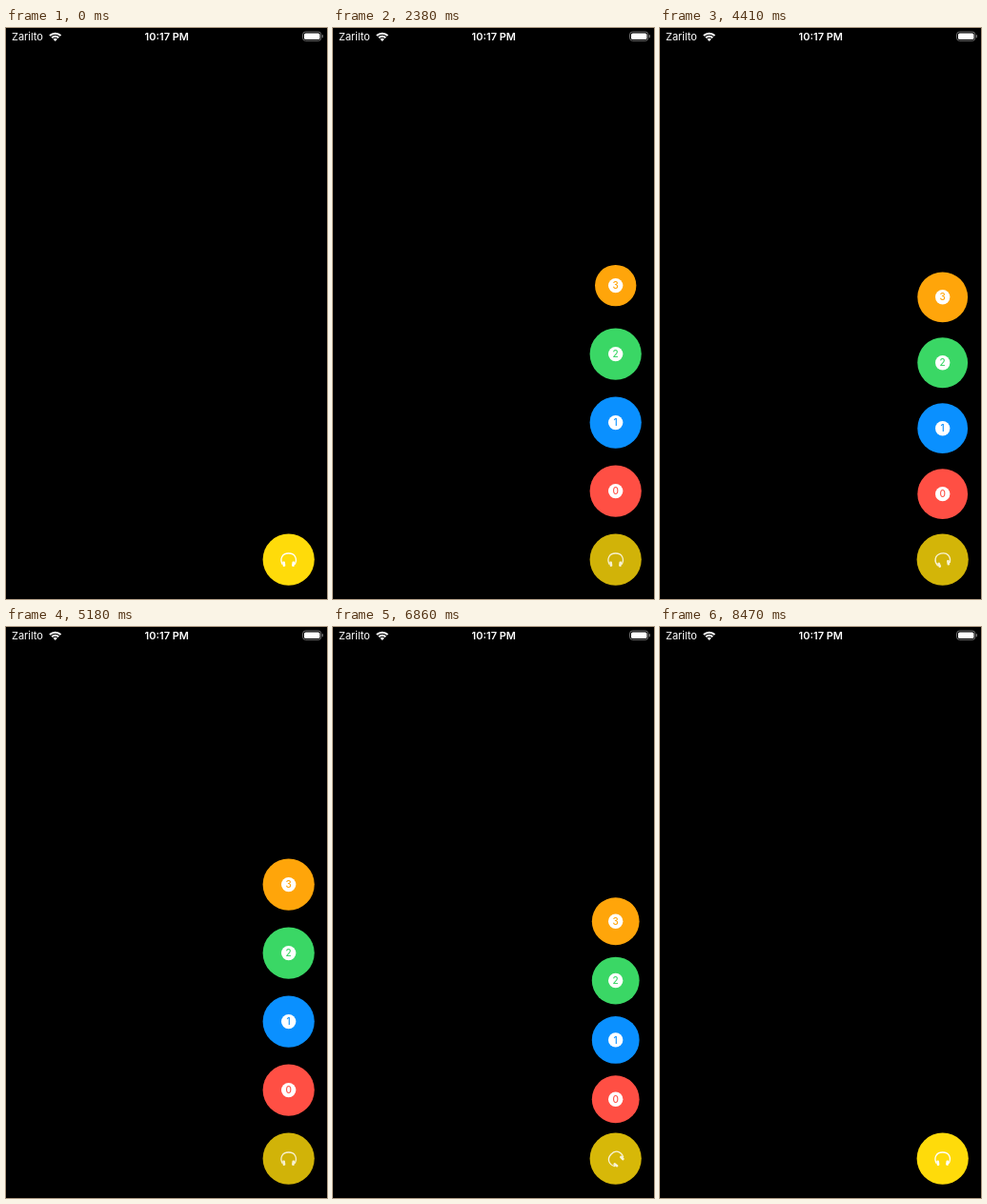
Write an HTML page with a canvas that moves like this. It is 337 px wide and 600 px high and loops after 8.54 s.

```html
<!DOCTYPE html>
<html lang="en">
<head>
<meta charset="utf-8">
<title>Floating menu</title>
<style>
  html, body { margin: 0; width: 100%; height: 100%; overflow: hidden; background: #000; }
  canvas { display: block; width: 337px; height: 600px; }
</style>
</head>
<body>
<canvas id="stage"></canvas>
<script>
const W = 337, H = 600, LOOP = 8540, TICK = 70;
const CX = 296.7, CY = 558.6, R = 27.1, GAP = 72;
const YELLOW = '#ffdb0a';
const COLORS = ['#ff4f44', '#0a90ff', '#3ad765', '#ffa50a'];
const FONT = 'Inter, "Liberation Sans", sans-serif';

// [open, close] times of the menu
const MENU = [[583, 2630], [4093, 5800], [6610, 7740]];
// item index -> [press, release] times
const PRESS = { 3: [[1600, 2630]], 0: [[7510, 7740]] };

const canvas = document.getElementById('stage');
const ctx = canvas.getContext('2d');
const ratio = window.devicePixelRatio || 1;
canvas.width = W * ratio;
canvas.height = H * ratio;

// Damped spring step response: response 0.55 s, damping 0.825
function spring(ms) {
  if (ms <= 0) return 0;
  const zeta = 0.825, omega = 2 * Math.PI / 0.55, t = ms / 1000;
  const decay = zeta * omega, wd = omega * Math.sqrt(1 - zeta * zeta);
  return 1 - Math.exp(-decay * t) * (Math.cos(wd * t) + decay / wd * Math.sin(wd * t));
}

// Springs add up, so a release during a press stays continuous
function level(spans, t) {
  return (spans || []).reduce((sum, [on, off]) => sum + spring(t - on) - spring(t - off), 0);
}

function disc(x, y, r, color) {
  ctx.fillStyle = color;
  ctx.beginPath();
  ctx.arc(x, y, r, 0, Math.PI * 2);
  ctx.fill();
}

function label(text, x, y, size, weight, align, color) {
  ctx.font = `${weight} ${size}px ${FONT}`;
  ctx.textAlign = align;
  ctx.fillStyle = color;
  ctx.fillText(text, x, y);
}

function pill(x, y, w, h, r) {
  ctx.beginPath();
  ctx.roundRect(x, y, w, h, r);
}

function wifi(x, y) {
  const mid = -Math.PI / 2, half = 0.77;
  ctx.strokeStyle = ctx.fillStyle = '#fff';
  ctx.lineWidth = 2.1;
  for (const r of [5.1, 8.3]) {
    ctx.beginPath();
    ctx.arc(x, y, r, mid - half, mid + half);
    ctx.stroke();
  }
  ctx.beginPath();
  ctx.moveTo(x, y);
  ctx.arc(x, y, 3.1, mid - half, mid + half);
  ctx.fill();
}

function battery() {
  ctx.strokeStyle = ctx.fillStyle = '#7c7c7c';
  ctx.lineWidth = 0.9;
  pill(311.6, 4, 19.2, 9.4, 2.9);
  ctx.stroke();
  pill(331.7, 7.1, 1.2, 3.2, 0.6);
  ctx.fill();
  ctx.fillStyle = '#fff';
  pill(313, 5.4, 16.5, 6.7, 1.7);
  ctx.fill();
}

function statusBar() {
  label('Zarilto', 6, 13, 11, 400, 'left', '#fff');
  label('10:17 PM', 168.8, 13, 11, 600, 'center', '#fff');
  wifi(51.7, 14);
  battery();
}

function headphones() {
  ctx.strokeStyle = ctx.fillStyle = '#fff';
  ctx.lineWidth = 1.3;
  ctx.lineCap = 'round';
  ctx.beginPath();
  ctx.moveTo(-6.7, 4.6);
  ctx.bezierCurveTo(-9.2, -0.5, -7.2, -6.6, 0, -6.6);
  ctx.bezierCurveTo(7.2, -6.6, 9.2, -0.5, 6.7, 4.6);
  ctx.stroke();
  for (const side of [-1, 1]) {
    ctx.save();
    ctx.translate(side * 4.9, 4.6);
    ctx.rotate(side * 0.12);
    pill(-1.35, -2.7, 2.7, 5.4, 1.1);
    ctx.fill();
    ctx.restore();
  }
}

function item(i, open, t) {
  const y = CY - GAP * (i + 1) * open;
  const scale = (0.4 + 0.6 * open) * (1 - 0.2 * level(PRESS[i], t));
  disc(CX, y, R * scale, COLORS[i]);
  disc(CX, y, 7.7, '#fff');
  label(i, CX, y + 3.6, 10, 500, 'center', COLORS[i]);
}

function mainButton(open) {
  ctx.save();
  ctx.globalAlpha = Math.min(1, 1 - 0.18 * open);
  disc(CX, CY, R, YELLOW);
  ctx.translate(CX, CY);
  ctx.rotate(open * Math.PI * 2);
  headphones();
  ctx.restore();
}

function draw(t) {
  const open = level(MENU, t);
  ctx.setTransform(ratio, 0, 0, ratio, 0, 0);
  ctx.fillStyle = '#000';
  ctx.fillRect(0, 0, W, H);
  statusBar();
  if (open > 0.01) COLORS.forEach((_, i) => item(i, open, t));
  mainButton(open);
}

const start = performance.now();
function frame() {
  const t = (performance.now() - start) % LOOP;
  draw(Math.floor(t / TICK) * TICK);
  requestAnimationFrame(frame);
}
frame();
</script>
</body>
</html>
```
